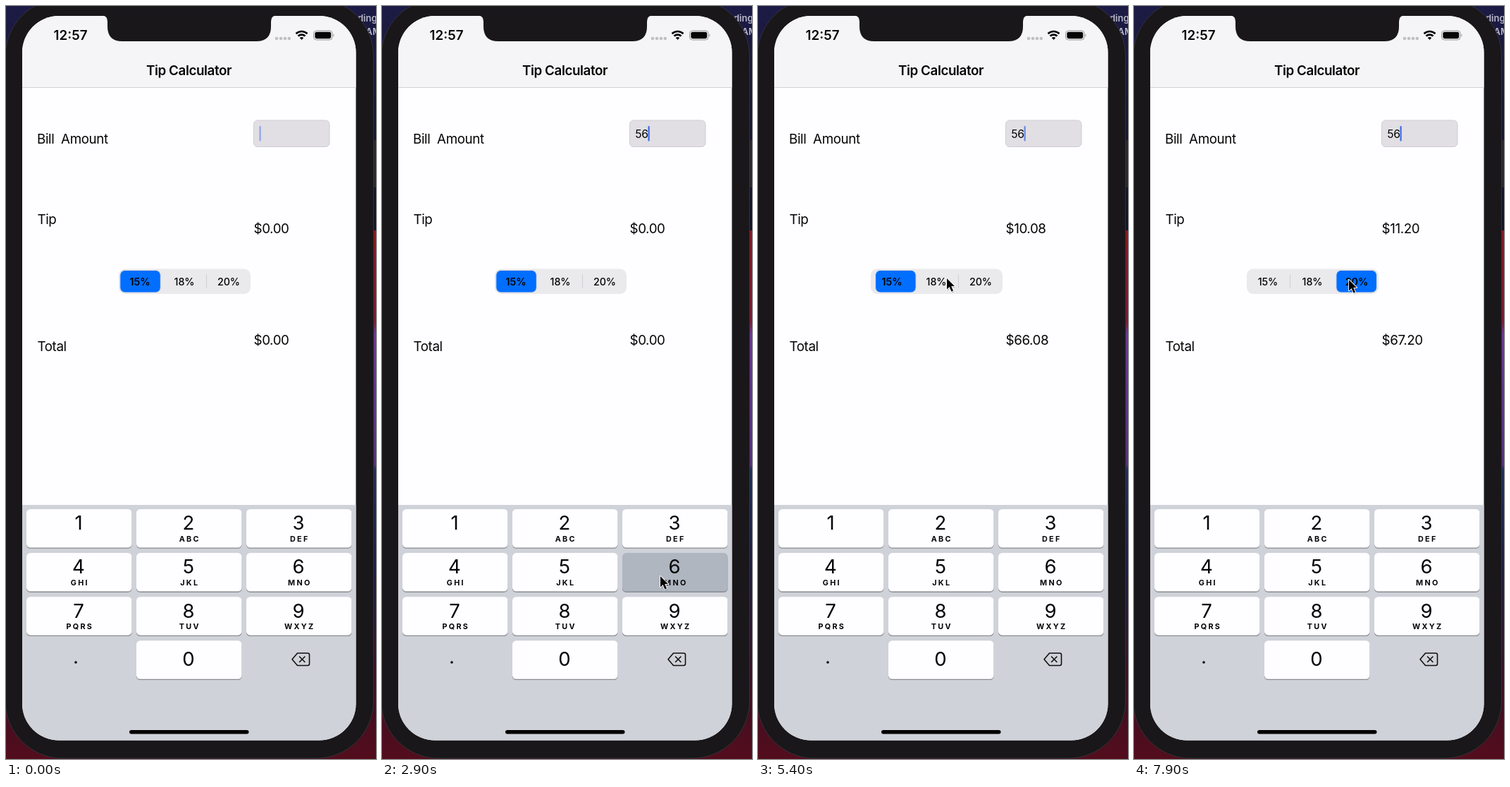
Write an HTML page that moves like this. It is 525x1067 px and loops after 8 s.

```html
<!DOCTYPE html>
<html lang="en">
<head>
<meta charset="utf-8">
<title>Tip Calculator</title>
<style>
  html, body { margin: 0; width: 100%; height: 100%; overflow: hidden; background: #17173a; }
  svg { display: block; width: 525px; height: 1067px; }
  text { font: 400 18.8px Inter, sans-serif; letter-spacing: -.4px; fill: #050505; white-space: pre; }
  .bold { font-weight: 600; }
  .mid { text-anchor: middle; }
  .clock { letter-spacing: 0; }
  .field { font-size: 15.7px; letter-spacing: -.3px; }
  .seg { font-size: 14.3px; font-weight: 500; letter-spacing: -.1px; text-anchor: middle; }
  .digit { font-size: 27.5px; letter-spacing: 0; text-anchor: middle; }
  .letters { font-size: 10.8px; font-weight: 700; letter-spacing: 2.3px; text-anchor: middle; }
  .behind { font-size: 13px; font-weight: 600; letter-spacing: 0; fill: #b9b8c8; }
</style>
</head>
<body>
<svg viewBox="0 0 525 1067">
  <defs>
    <linearGradient id="desk" x2="0" y2="1">
      <stop offset="0" stop-color="#1c1b45"/>
      <stop offset=".17" stop-color="#15152f"/>
      <stop offset=".298" stop-color="#121226"/>
      <stop offset=".298" stop-color="#8a1820"/>
      <stop offset=".42" stop-color="#7d1a33"/>
      <stop offset=".435" stop-color="#6a3699"/>
      <stop offset=".61" stop-color="#56307e"/>
      <stop offset=".615" stop-color="#1d2f5a"/>
      <stop offset=".75" stop-color="#1c1c40"/>
      <stop offset=".9" stop-color="#3c0f22"/>
      <stop offset="1" stop-color="#530d1d"/>
    </linearGradient>
    <clipPath id="screen"><rect x="23" y="14" width="473.5" height="1026.5" rx="52"/></clipPath>
  </defs>

  <rect width="525" height="1067" fill="url(#desk)"/>
  <rect x="520" y="190" width="5" height="67" fill="#29282f"/>
  <text class="behind" x="499" y="21.5">ding</text>
  <text class="behind" x="510.5" y="41">AM</text>
  <rect x="-1" y="-10" width="522.5" height="1076" rx="81" fill="#19171a" stroke="#343236"/>

  <g clip-path="url(#screen)">
    <rect x="23" y="14" width="474" height="1027" fill="#fefdff"/>
    <rect x="23" y="14" width="474" height="101" fill="#f5f4f6"/>
    <rect x="23" y="115" width="474" height="1" fill="#d2d1d4"/>
    <rect x="23" y="707" width="474" height="334" fill="#cfd2d8"/>
  </g>
  <path fill="#19171a" d="M137 13.500Q144 14 144 22V29Q144 50 165 50H355Q376 50 376 29V22Q376 14 383 13.500Z"/>

  <text class="bold clock" x="67.500" y="48">12:57</text>
  <g fill="#c0bfc2">
    <circle cx="384" cy="46" r="2.300"/><circle cx="390" cy="46" r="2.300"/>
    <circle cx="395.900" cy="46" r="2.300"/><circle cx="401.800" cy="46" r="2.300"/>
  </g>
  <g fill="none" stroke="#050505" stroke-width="2.700">
    <path d="M411.500 39.200A11.600 11.600 0 0 1 427.500 39.200M414.500 42.600A7.200 7.200 0 0 1 424.500 42.600"/>
    <path d="M419.500 48L416.700 45Q419.500 42.800 422.300 45Z" fill="#050505" stroke="none"/>
  </g>
  <rect x="436.500" y="35" width="26.500" height="13" rx="4" fill="none" stroke="#969598"/>
  <rect x="438.300" y="36.800" width="22.900" height="9.400" rx="2.400" fill="#050505"/>
  <path d="M464.500 39.300Q466.700 41.500 464.500 43.700Z" fill="#969598"/>

  <text class="bold mid" x="259.500" y="97.500">Tip Calculator</text>
  <text x="44" y="194.500">Bill  Amount</text>
  <text x="44.500" y="309">Tip</text>
  <text x="44.500" y="488.500">Total</text>
  <text id="tip" x="351.500" y="321.500"></text>
  <text id="total" x="351.500" y="479.500"></text>

  <rect x="351.500" y="162" width="107.500" height="37.500" rx="5.500" fill="#e1dfe4" stroke="#cfcdd2"/>
  <text class="field" id="bill" x="359.300" y="187"></text>
  <rect id="caret" y="170" width="2.200" height="21.500" rx="1" fill="#3b6be0"/>

  <rect x="160" y="372.500" width="187" height="35.500" rx="9" fill="#eae9ec"/>
  <rect id="leftRule" x="221" y="380" width="1" height="20" fill="#cfced2"/>
  <rect id="rightRule" x="284" y="380" width="1" height="20" fill="#cfced2"/>
  <rect id="pill" y="374.500" width="57.500" height="31.500" rx="7" fill="#006eff" stroke="#dddce2"/>
  <g id="rates"></g>

  <g id="keys"></g>
  <circle cx="99" cy="930" r="1.800"/>
  <g fill="none" stroke="#111" stroke-width="1.600" stroke-linecap="round" stroke-linejoin="round">
    <path d="M413.500 917H428Q430.500 917 430.500 919.500V932Q430.500 934.500 428 934.500H413.500L406 925.700Z"/>
    <path d="M416.500 922L424 929.500M424 922L416.500 929.500"/>
  </g>
  <rect x="175" y="1026" width="169.500" height="5.500" rx="2.750"/>

  <g id="pointer">
    <path d="M1 2V17.500L4.600 14L7.400 20.500L10 19.400L7.200 13H12Z" opacity=".2"/>
    <path d="M0 0V15.500L3.600 12L6.400 18.500L9 17.400L6.200 11H11Z" stroke="#fff" stroke-width="1.800" paint-order="stroke" stroke-linejoin="round"/>
  </g>
</svg>

<script>
const LOOP = 8000, STEP = 100;
const $ = id => document.getElementById(id);
const clamp = v => Math.min(1, Math.max(0, v));
const ease = v => v * v * (3 - 2 * v);

const letters = ['', 'ABC', 'DEF', 'GHI', 'JKL', 'MNO', 'PQRS', 'TUV', 'WXYZ'];

function key(digit, col, row, label = '') {
  const x = 29 + col * 156, y = 713 + row * 62.1;
  const middle = x + 74.5;
  const digitY = y + (label || digit === 1 ? 29.300 : 36);
  return `<rect x="${x}" y="${y + 1.3}" width="149.500" height="54.500" rx="5.500" fill="#898b90"/>
    <rect id="key${digit}" x="${x}" y="${y}" width="149.500" height="54.500" rx="5.500" fill="#fefdff"/>
    <text class="digit" x="${middle - 0.5}" y="${digitY}">${digit}</text>
    <text class="letters" x="${middle + 1.3}" y="${y + 46}">${label}</text>`;
}

$('keys').innerHTML = letters
  .map((label, i) => key(i + 1, i % 3, Math.floor(i / 3), label))
  .join('') + key(0, 1, 3);

const rates = [[15, 190], [18, 253], [20, 316]];
$('rates').innerHTML = rates
  .map(([rate, x]) => `<text class="seg" x="${x}" y="395.500">${rate}%</text>`)
  .join('');
const rateLabels = [...$('rates').children];

// time, x, y of the pointer's tip
const route = [
  [1000, 535, 640], [1800, 261, 802], [2300, 261, 802], [2800, 395, 808],
  [3700, 395, 808], [4500, 318, 543], [5200, 268, 386], [6750, 268, 386],
  [7050, 299, 409], [7150, 299, 409], [7400, 305, 388], [8000, 305, 388]
];

function pointerAt(t) {
  const i = route.findIndex(stop => stop[0] > t);
  if (i < 1) return route[0].slice(1);
  const [t0, x0, y0] = route[i - 1], [t1, x1, y1] = route[i];
  const k = ease((t - t0) / (t1 - t0));
  return [x0 + (x1 - x0) * k, y0 + (y1 - y0) * k];
}

function caretOpacity(t) {
  if (t >= 2000 && t < 3350) return 1;
  const phase = (t < 2000 ? t + 450 : t) % 1000;
  return phase < 700 ? 1 - clamp((phase - 350) / 200) : clamp((phase - 720) / 160);
}

const money = v => '$' + v.toFixed(2);
const slide = (t, start) => ease(clamp((t - start) / 500));

function draw(t) {
  const bill = t < 2000 ? '' : t < 2800 ? '5' : '56';
  $('bill').textContent = bill;
  $('caret').setAttribute('x', [359.5, 368, 377.5][bill.length]);
  $('caret').setAttribute('opacity', caretOpacity(t));

  const rate = t < 5400 ? 0 : t < 7500 ? 0.18 : 0.2;
  $('tip').textContent = money(56 * rate);
  $('total').textContent = money(rate && 56 * (1 + rate));

  const first = slide(t, 5315), second = slide(t, 7415);
  $('pill').setAttribute('x', 161.8 + 62.300 * first + 63 * second);
  $('leftRule').setAttribute('opacity', second);
  $('rightRule').setAttribute('opacity', 1 - first);
  const chosen = Math.round(first) + Math.round(second);
  rateLabels.forEach((label, i) => label.style.fontWeight = i === chosen ? 600 : 500);

  const pressed = (from, to) => t >= from && t < to ? '#afb6c0' : '#fefdff';
  $('key5').setAttribute('fill', pressed(2000, 2200));
  $('key6').setAttribute('fill', pressed(2800, 3000));

  $('pointer').setAttribute('transform', `translate(${pointerAt(t)})`);
}

const begin = performance.now();
function tick() {
  const t = (performance.now() - begin) % LOOP;
  draw(Math.floor(t / STEP) * STEP);
  requestAnimationFrame(tick);
}
tick();
</script>
</body>
</html>
```
